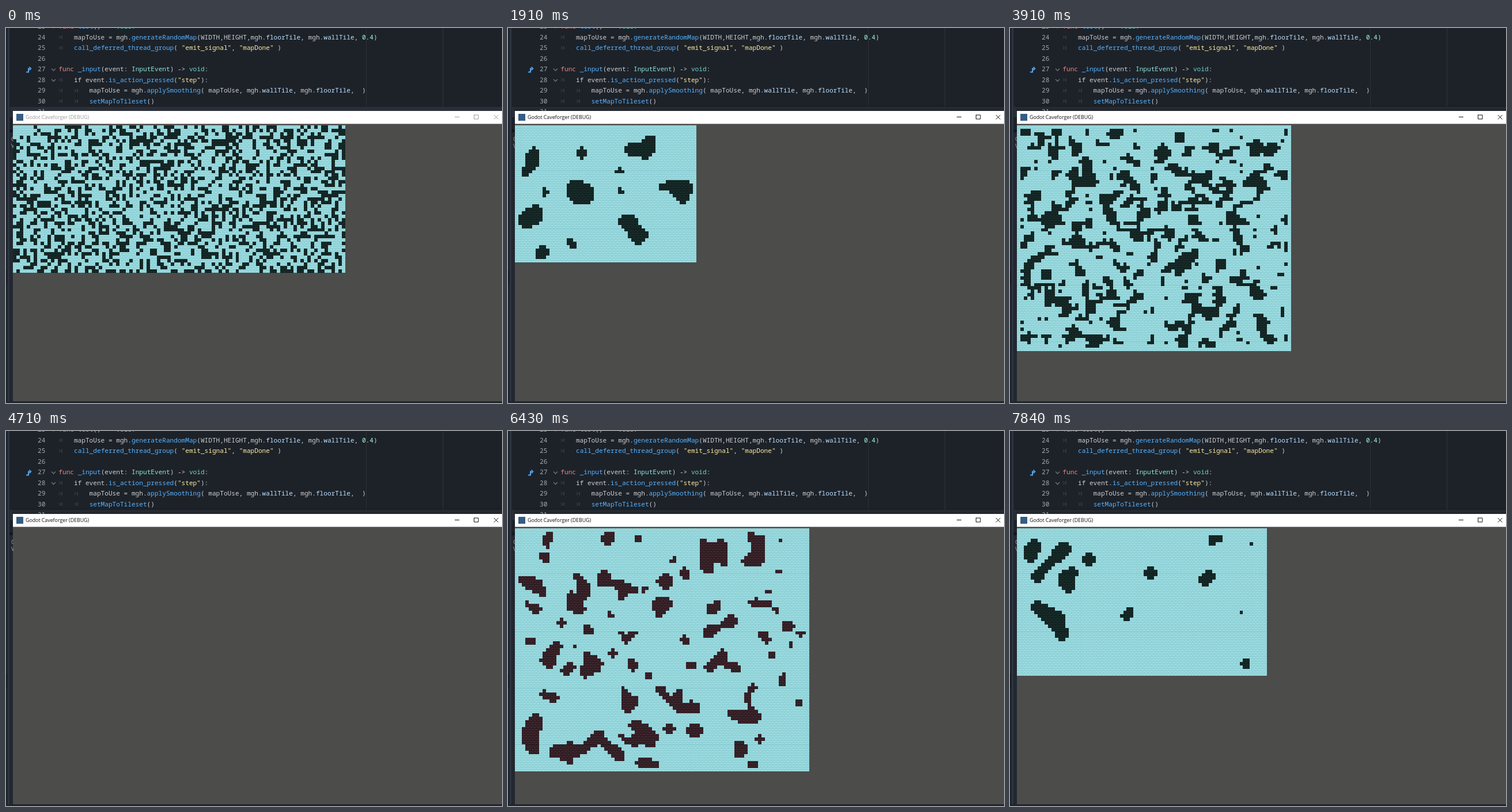
Recreate the animation shown at these times as an HTML page with a canvas. Size 861 by 651 pixels, loop 8 s.

```html
<!DOCTYPE html>
<html lang="en">
<head>
<meta charset="utf-8">
<title>Cave map smoothing</title>
<style>
html, body { margin: 0; width: 100%; height: 100%; overflow: hidden; background: #1d2229; }
canvas { position: absolute; left: 0; top: 0; }
#code { position: absolute; left: 0; top: 0; width: 861px; height: 144px; overflow: hidden; }
pre {
  position: absolute; top: -12px; margin: 0; color: #cdcfd2;
  font: 11.12px/18.5px "Noto Sans Mono", "DejaVu Sans Mono", monospace;
  font-variant-ligatures: none;
}
#nums { left: 55px; color: #a3abb0; }
#text { left: 91.3px; }
.k { color: #e88580; } .f { color: #57b3ff; } .t { color: #8fe5d8; }
.s { color: #ffeda1; } .n { color: #a1ffe0; } .m { color: #bce0ff; }
.v { color: #6fd3c8; }
#log { position: absolute; left: 9px; top: 187px; width: 4px; overflow: hidden; color: #a8adb4; font: 9px/11.5px "Open Sans", sans-serif; }
#title { position: absolute; left: 34px; top: 149px; white-space: pre; font: 8.8px/12px "Open Sans", "Noto Sans", sans-serif; }
</style>
</head>
<body>
<canvas id="stage" width="861" height="651"></canvas>
<div id="code">
<pre id="nums">23
24
25
26
27
28
29
30
31</pre>
<pre id="text"><span class="k">func</span> <span class="f">test</span>() -> <span class="v">void</span>:
    mapToUse = mgh.<span class="f">generateRandomMap</span>(WIDTH,HEIGHT,mgh.<span class="m">floorTile</span>, mgh.<span class="m">wallTile</span>, <span class="n">0.4</span>)
    <span class="f">call_deferred_thread_group</span>( <span class="s">"emit_signal"</span>, <span class="s">"mapDone"</span> )

<span class="k">func</span> <span class="f">_input</span>(event: <span class="t">InputEvent</span>) -> <span class="v">void</span>:
    if event.<span class="f">is_action_pressed</span>(<span class="s">"step"</span>):
        mapToUse = mgh.<span class="f">applySmoothing</span>( mapToUse, mgh.<span class="m">wallTile</span>, mgh.<span class="m">floorTile</span>,  )
        <span class="f">setMapToTileset</span>()
</pre>
</div>
<div id="log">O<br>V</div>
<div id="title">Godot Caveforger (DEBUG)</div>
<script>
const LOOP = 8000, CELL = 5.94, LEFT = 12.4, TOP = 169.3;
const LIGHT = ['#a2e1e4', '#7fc4cc'];
const GREEN = ['#1b322f', '#0b1516'];
const RED = ['#482b33', '#1a1115'];
const ctx = document.getElementById('stage').getContext('2d');
const title = document.getElementById('title');

// Noise appears at start; smoothing passes begin at first and repeat; end clears the map.
// Caves (x, y, radius in cells) are spots where the noise is denser.
const maps = [
  { cols: 97, rows: 43, start: 0, passes: 0, end: 200 },
  { cols: 53, rows: 40, start: 400, first: 1000, every: 303, passes: 4, end: 2110,
    caves: [[5.5, 9, 2.2], [37, 6, 2.2], [18, 18, 3.5], [48.5, 19, 2.5], [4, 26.5, 2.5], [33.5, 27.5, 2.4], [7.5, 35.5, 2]] },
  { cols: 63, rows: 29, start: 2210, first: 2310, every: 200, passes: 5, end: 3510,
    caves: [[5.7, 9.6, 2], [17.4, 9, 2], [34, 7.7, 2.8], [14, 17, 2], [58, 16, 2.8], [23, 24.5, 2]] },
  { cols: 80, rows: 66, start: 3610, first: 3810, every: 200, passes: 4, end: 4710 },
  { cols: 62, rows: 48, start: 4810, first: 4910, every: 200, passes: 3, end: 5410 },
  { cols: 86, rows: 71, start: 5720, first: 6020, every: 200, passes: 4, end: 6840, dark: RED },
  { cols: 73, rows: 43, start: 7040, first: 7240, every: 150, passes: 5, end: LOOP,
    caves: [[13.5, 5, 2.3], [21, 8, 2], [55, 3, 2], [6, 13, 2.3], [13, 16, 2], [37.6, 12, 2.4], [10, 24.5, 2.1]] }
];

function random(seed) {
  return () => {
    seed = (seed + 0x6d2b79f5) | 0;
    let t = Math.imul(seed ^ (seed >>> 15), 1 | seed);
    t = (t + Math.imul(t ^ (t >>> 7), 61 | t)) ^ t;
    return ((t ^ (t >>> 14)) >>> 0) / 4294967296;
  };
}

const makeGrid = (map, fn) =>
  Array.from({ length: map.rows }, (_, y) => Array.from({ length: map.cols }, (_, x) => fn(x, y)));

function density(map, x, y) {
  if (!map.caves) return 0.4;
  return map.caves.some(([cx, cy, r]) => Math.hypot(x - cx, y - cy) <= r) ? 0.85 : 0.37;
}

// A cell stays dark when at least five of its 3x3 block are dark.
function smooth(map, grid) {
  return makeGrid(map, (x, y) => {
    if (x < 1 || y < 1 || x >= map.cols - 1 || y >= map.rows - 1) return false;
    let n = 0;
    for (let j = -1; j < 2; j++) for (let i = -1; i < 2; i++) n += grid[y + j][x + i];
    return n >= 5;
  });
}

maps.forEach((map, i) => {
  const rnd = random(11 * (i + 1));
  map.steps = [makeGrid(map, (x, y) => rnd() < density(map, x, y))];
  for (let k = 0; k < map.passes; k++) map.steps.push(smooth(map, map.steps[k]));
});

function stepAt(map, t) {
  if (!map.passes || t < map.first) return 0;
  return Math.min(map.passes, 1 + Math.floor((t - map.first) / map.every));
}

const px = c => Math.round(LEFT + c * CELL);
const py = r => Math.round(TOP + r * CELL);

function rect(color, x, y, w, h) {
  ctx.fillStyle = color;
  ctx.fillRect(x, y, w, h);
}

function line(color, width, ...pts) {
  ctx.strokeStyle = color;
  ctx.lineWidth = width;
  ctx.beginPath();
  for (let i = 0; i < pts.length; i += 2) ctx.lineTo(pts[i], pts[i + 1]);
  ctx.stroke();
}

function bricks(map, [face, mortar]) {
  const x = px(0), y = py(0), w = px(map.cols) - x;
  rect(face, x, y, w, py(map.rows) - y);
  ctx.fillStyle = mortar;
  for (let k = 0; k < map.rows * 2; k++) {
    const top = py(k / 2), bottom = py((k + 1) / 2);
    ctx.fillRect(x, bottom - 1, w, 1);
    for (let c = 0; c < map.cols; c++) ctx.fillRect(px(c + (k % 2 ? 0.7 : 0.2)), top, 0.6, bottom - top - 1);
  }
}

function drawMap(map, grid) {
  bricks(map, LIGHT);
  ctx.save();
  ctx.beginPath();
  grid.forEach((row, y) => row.forEach((dark, x) => {
    if (dark) ctx.rect(px(x), py(y), px(x + 1) - px(x), py(y + 1) - py(y));
  }));
  ctx.clip();
  bricks(map, map.dark || GREEN);
  ctx.restore();
}

function tabMark(x, y) {
  line('#4a5058', 1, x, y - 2.5, x + 2.5, y, x, y + 2.5);
  line('#4a5058', 1, x + 5, y - 3, x + 5, y + 3);
}

function drawEditor() {
  rect('#1d2229', 0, 0, 861, 651);
  rect('#2a2f38', 7, 137, 854, 18);
  rect('#2b3038', 625, 0, 1, 137);
  rect('#2f343c', 758, 0, 1, 137);
  rect('#1f242c', 0, 0, 7, 651);
  rect('#2d3542', 3, 0, 3, 651);
  rect('#15191f', 6, 176, 7, 5);
  rect('#232831', 7, 181, 6, 470);
  rect('#171b21', 0, 421, 2, 25);
  for (const y of [16, 34.5, 90, 108.7, 127]) tabMark(92, y);
  for (const y of [108.7, 127]) tabMark(119, y);
  for (const y of [-2, 72, 90.5]) line('#656b73', 1.6, 79, y - 1.5, 82.5, y + 2, 86, y - 1.5);
  line('#57a5e8', 2, 35, 76.5, 39, 76.5, 39, 70.5, 42, 70.5);
  line('#57a5e8', 1.6, 40.5, 67.5, 43.5, 70.5, 40.5, 73.5);
}

function drawWindow(active) {
  if (active) {
    const g = ctx.createLinearGradient(0, 131, 0, 144);
    g.addColorStop(0, 'rgba(0,0,0,0)');
    g.addColorStop(1, 'rgba(0,0,0,0.2)');
    rect(g, 10, 131, 851, 13);
  }
  rect('#4c4c4a', 12, 166, 849, 482);
  rect('#ffffff', 12, 144, 849, 22.4);
  rect('#20252d', 0, 648, 861, 3);
  rect('#365d83', 18, 149, 12, 12);
  const ink = active ? '#111111' : '#999999';
  line(ink, 1, 779, 154.5, 787, 154.5);
  line(ink, 1, 812.5, 151, 820, 151, 820, 158, 812.5, 158, 812.5, 150.5);
  line(ink, 1, 847, 151, 854.5, 158.5);
  line(ink, 1, 854.5, 151, 847, 158.5);
  title.style.color = ink;
}

let shown = '';
function frame(now) {
  const t = now % LOOP;
  const active = t >= 100;
  const map = maps.find(m => t >= m.start && t < m.end);
  const step = map ? stepAt(map, t) : -1;
  const key = [active, maps.indexOf(map), step].join();
  if (key !== shown) {
    shown = key;
    drawEditor();
    drawWindow(active);
    if (map) drawMap(map, map.steps[step]);
  }
  requestAnimationFrame(frame);
}
frame(0);
</script>
</body>
</html>
```
